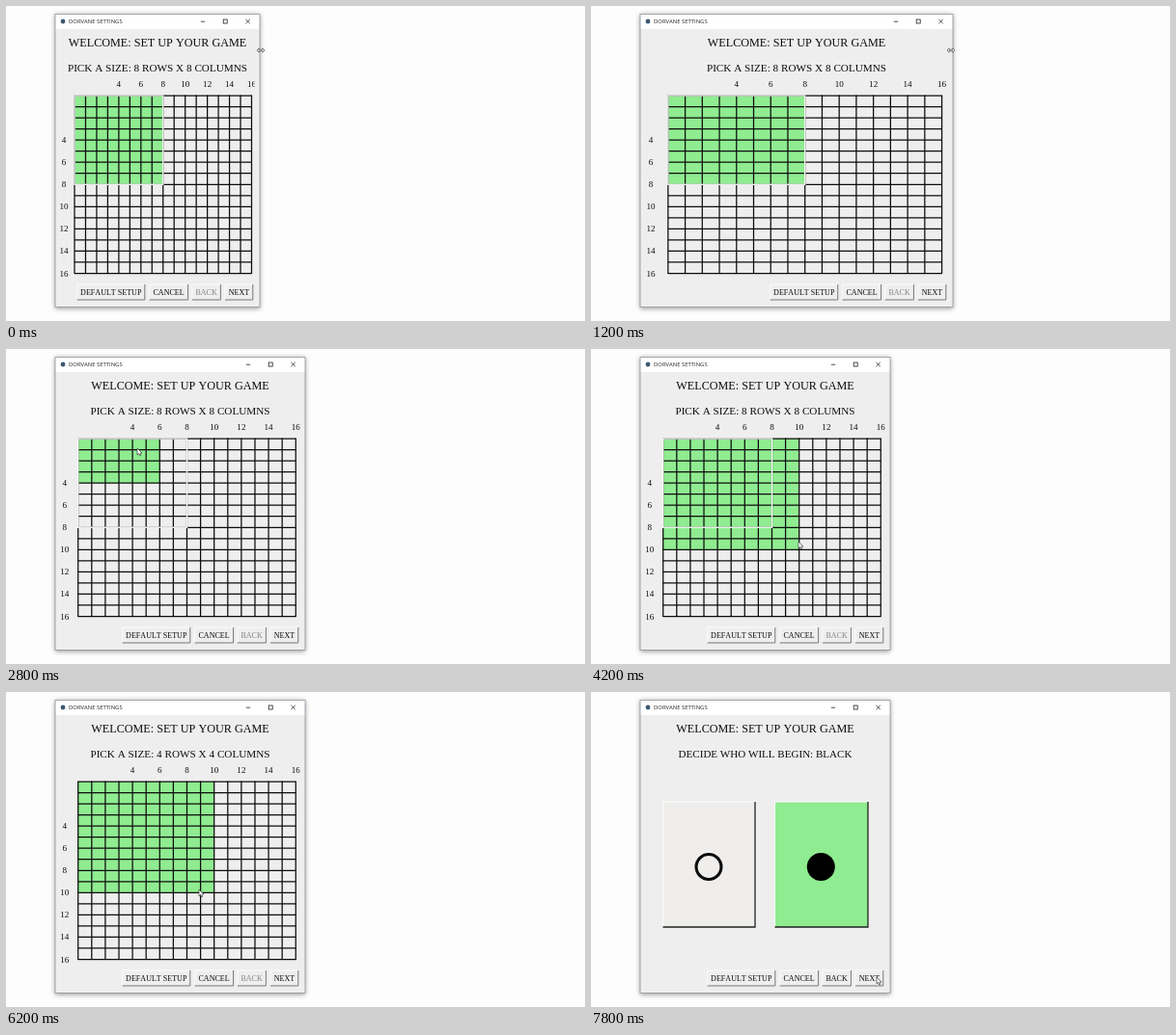
Recreate the animation shown at these times as an HTML page with a canvas. Size 600x327 px, loop 8 s.

```html
<!DOCTYPE html>
<html lang="en">
<head>
<meta charset="utf-8">
<title>Board setup</title>
<style>
  html, body { margin: 0; width: 100%; height: 100%; overflow: hidden; background: #fefdfe; }
  canvas { display: block; width: 600px; height: 327px; }
</style>
</head>
<body>
<canvas id="stage"></canvas>
<script>
const LOOP = 8000, STEP = 200;
const LEFT = 51, TOP = 8, BOTTOM = 312.5;
const GRID_TOP = 93, GRID_BOTTOM = 277.5, CELLS = 16;
const ROW = (GRID_BOTTOM - GRID_TOP) / CELLS;
const CLICK_SIZE = 5200, CLICK_NEXT = 7400, LEAVE_EDGE = 2000;
const GREY = '#efeeee', GREEN = '#8fec90', BLACK = '#0c0c0c';
const SERIF = '"Liberation Serif", serif';

// Keyframes: [time, value, ...]
const edgeKeys = [[0, 263], [200, 273], [800, 377], [1000, 395], [1200, 375], [1400, 332], [1600, 310]];
const pointerKeys = [
  [0, 264, 46], [200, 292, 46], [800, 417.5, 46], [1000, 411, 46], [1200, 373, 46], [1400, 332, 46],
  [1600, 311, 46], [1800, 311, 46], [2200, 300, 60], [2600, 200, 84], [2800, 136, 103],
  [3200, 165, 140], [3800, 230, 215], [4200, 215, 200], [4800, 135, 140], [5000, 131.6, 134],
  [6000, 131.6, 134], [6200, 200, 205], [6400, 275, 282], [6600, 293, 291], [7000, 296, 296]
];

const canvas = document.getElementById('stage');
const ctx = canvas.getContext('2d');
const ratio = window.devicePixelRatio || 1;
canvas.width = 600 * ratio;
canvas.height = 327 * ratio;

function sample(keys, t) {
  const next = keys.findIndex(k => k[0] > t);
  if (next < 0) return keys[keys.length - 1].slice(1);
  const a = keys[next - 1], b = keys[next];
  const p = (t - a[0]) / (b[0] - a[0]);
  return a.slice(1).map((v, i) => v + (b[i + 1] - v) * p);
}

function rect(x, y, w, h, color) {
  ctx.fillStyle = color;
  ctx.fillRect(x, y, w, h);
}

function path(points, color, width, close) {
  ctx.beginPath();
  points.forEach(([x, y]) => ctx.lineTo(x, y));
  if (close) ctx.closePath();
  ctx.strokeStyle = color;
  ctx.lineWidth = width;
  ctx.stroke();
}

function text(str, x, y, size, color = BLACK, align = 'center', family = SERIF) {
  ctx.font = `${size}px ${family}`;
  ctx.textAlign = align;
  ctx.fillStyle = color;
  ctx.fillText(str, x, y);
}

function disc(x, y, r, color) {
  ctx.beginPath();
  ctx.arc(x, y, r, 0, Math.PI * 2);
  ctx.fillStyle = color;
  ctx.fill();
}

function raised(x1, y1, x2, y2, fill, dark, width) {
  rect(x1, y1, x2 - x1, y2 - y1, fill);
  path([[x1, y2], [x1, y1], [x2, y1]], '#fbfbfb', 1);
  path([[x1, y2], [x2, y2], [x2, y1]], dark, width);
}

function drawWindow(right) {
  const w = right - LEFT;
  ctx.save();
  ctx.shadowColor = 'rgba(0,0,0,.42)';
  ctx.shadowBlur = 5 * ratio;
  ctx.shadowOffsetY = ratio;
  rect(LEFT, TOP, w, BOTTOM - TOP, GREY);
  ctx.restore();
  rect(LEFT, TOP, w, 16, '#fff');
  ctx.strokeStyle = '#8f979d';
  ctx.lineWidth = 0.8;
  ctx.strokeRect(LEFT, TOP + 0.4, w, BOTTOM - TOP - 0.4);

  disc(59, 16, 2.4, '#3d5872');
  text('DORVANE SETTINGS', 65, 18.2, 5.9, '#222', 'left', '"Open Sans", sans-serif');
  const min = right - 59, max = right - 35.8, close = right - 12.4;
  path([[min - 2.2, 16.2], [min + 2.2, 16.2]], '#222', 0.8);
  ctx.strokeRect(max - 2, 14, 4, 4);
  path([[close - 2.2, 13.8], [close + 2.2, 18.2]], '#222', 0.8);
  path([[close - 2.2, 18.2], [close + 2.2, 13.8]], '#222', 0.8);
}

function drawButtons(right, backEnabled) {
  const items = [['DEFAULT SETUP', 189.3, 119.2], ['CANCEL', 114.4, 74.4], ['BACK', 70.2, 40.6], ['NEXT', 36, 7.2]];
  for (const [label, a, b] of items) {
    raised(right - a, 289, right - b, 305, GREY, '#777', 1);
    const off = label === 'BACK' && !backEnabled;
    text(label, right - (a + b) / 2, 299.8, 8.05, off ? '#858585' : BLACK);
  }
}

function gridShape(right) {
  const extra = right - 263;
  const x = 71 + extra * 0.079;
  const end = right - 8.5 - extra * 0.026;
  return { x, end, cell: (end - x) / CELLS, labelX: 60 + extra * 0.0175 };
}

const evenSize = cell => Math.max(4, 2 * Math.ceil((Math.floor(cell) + 1) / 2));

function selection(g, px, py, picked) {
  const inside = px > g.x && px < g.end && py > GRID_TOP && py < GRID_BOTTOM;
  if (!inside) return [picked, picked];
  return [evenSize((px - g.x) / g.cell), evenSize((py - GRID_TOP) / ROW)];
}

function drawGrid(right, px, py, picked) {
  const g = gridShape(right);
  const [cols, rows] = selection(g, px, py, picked);

  ctx.save();
  ctx.beginPath();
  ctx.rect(LEFT, 70, right - 5.3 - LEFT, 215);
  ctx.clip();
  rect(g.x, GRID_TOP, cols * g.cell, rows * ROW, GREEN);
  for (let i = 0; i <= CELLS; i++) {
    const x = g.x + i * g.cell, y = GRID_TOP + i * ROW;
    path([[x, GRID_TOP - 0.6], [x, GRID_BOTTOM + 0.6]], BLACK, 1.25);
    path([[g.x, y], [g.end, y]], BLACK, 1.25);
    if (i >= 4 && i % 2 === 0) {
      text(i, x, 84, 9.1);
      text(i, g.labelX, y + 3, 9.1);
    }
  }
  // The first selection keeps a pale frame until another size is picked.
  if (picked === 8) {
    ctx.strokeStyle = '#f7f8f6';
    ctx.lineWidth = 1.4;
    ctx.strokeRect(g.x, GRID_TOP, 8 * g.cell, 8 * ROW);
  }
  ctx.restore();
}

function drawStarter() {
  raised(74.5, 114, 170, 244, '#efeeec', '#222', 1.3);
  raised(190.5, 114, 287, 244, GREEN, '#222', 1.3);
  disc(122, 181.5, 14.5, BLACK);
  disc(122, 181.5, 11.4, '#efeeec');
  disc(238.3, 181.5, 14.5, '#000');
}

function drawPointer(x, y, resizing) {
  const shape = resizing
    ? [[-4, 0], [-1.8, -2.1], [-1.8, -0.7], [1.8, -0.7], [1.8, -2.1], [4, 0],
       [1.8, 2.1], [1.8, 0.7], [-1.8, 0.7], [-1.8, 2.1]]
    : [[0, 0], [0, 7], [1.6, 5.5], [2.7, 8], [3.8, 7.5], [2.8, 5.2], [5, 5]];
  const points = shape.map(([dx, dy]) => [x + dx, y + dy]);
  ctx.beginPath();
  points.forEach(p => ctx.lineTo(...p));
  ctx.fillStyle = '#fff';
  ctx.fill();
  path(points, '#333', 0.65, true);
}

function draw(t) {
  const [right] = sample(edgeKeys, t);
  const [px, py] = sample(pointerKeys, t);
  const picked = t < CLICK_SIZE ? 8 : 4;
  const second = t >= CLICK_NEXT;
  const mid = (LEFT + right) / 2;

  ctx.setTransform(ratio, 0, 0, ratio, 0, 0);
  ctx.fontKerning = 'none';
  rect(0, 0, 600, 327, '#fefdfe');
  drawWindow(right);
  text('WELCOME: SET UP YOUR GAME', mid, 41.7, 12.17);
  if (second) {
    text('DECIDE WHO WILL BEGIN: BLACK', mid, 67.6, 11.05);
    drawStarter();
  } else {
    text(`PICK A SIZE: ${picked} ROWS X ${picked} COLUMNS`, mid, 67.6, 11.2);
    drawGrid(right, px, py, picked);
  }
  drawButtons(right, second);
  drawPointer(px, py, t < LEAVE_EDGE);
}

const start = performance.now();
function tick() {
  const t = (performance.now() - start) % LOOP;
  draw(Math.floor(t / STEP) * STEP);
  requestAnimationFrame(tick);
}
tick();
</script>
</body>
</html>
```
